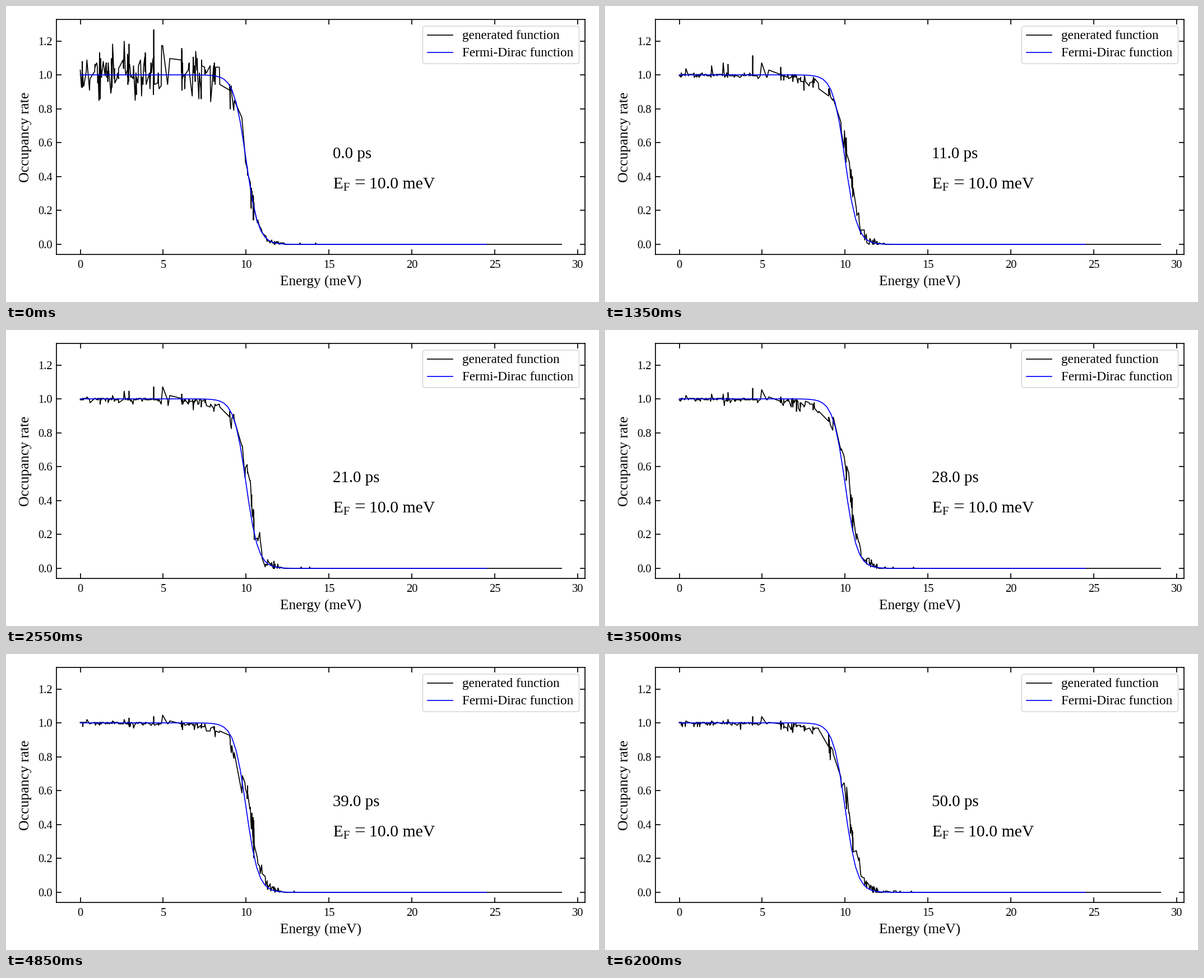
Write a matplotlib script that moves like this. It is 1058 px wide and 529 px high and loops after 6250 ms.

```python
import math

import numpy as np
import matplotlib.pyplot as plt
from matplotlib.animation import FuncAnimation
from matplotlib.patches import FancyBboxPatch

W, H, DPI = 1058, 529, 64
FRAMES, STEP = 125, 0.4          # frame count, ps per frame
E_F, KT = 10.0, 0.366            # meV
QUANTUM = 0.0085                 # smallest change in occupancy

# Overfull levels that relax slowly: energy -> (excess, time constant in ps)
SLOW = {0.4: (0.09, 15), 1.95: (0.185, 7), 2.65: (0.195, 10),
        2.94: (0.18, 12), 4.43: (0.265, 14), 4.97: (0.17, 25),
        5.4: (0.1, 10), 6.12: (0.16, 8)}

rng = np.random.default_rng(12)


def pt(px):
    return px * 72 / DPI


def fermi(e, mu=E_F, kt=KT):
    return 1 / (1 + np.exp((e - mu) / kt))


def build_levels(pairs=155):
    """Energies in close pairs, with noisy starting values and decay times."""
    base = rng.uniform(0.03, 15, pairs)
    e = np.sort(np.concatenate([[0, 29.03], base, base + 0.03, list(SLOW)]))
    f = fermi(e)
    value = f + 0.064 * np.sqrt(f) * rng.standard_normal(e.size)
    tau = rng.uniform(0.7, 2.5, e.size)
    for level, (excess, slow_tau) in SLOW.items():
        i = np.searchsorted(e, level)
        value[i], tau[i] = 1 + excess, slow_tau
    return e, value, tau


def correlated_noise(keep=0.6):
    rows = rng.standard_normal((FRAMES, energy.size))
    for k in range(1, FRAMES):
        rows[k] = keep * rows[k - 1] + math.sqrt(1 - keep ** 2) * rows[k]
    return rows


energy, start, tau = build_levels()
# Relaxed state: a shifted step whose lower side is softer
goal = fermi(energy, 10.2, np.where(
    energy > 10.2, 0.35, 0.5 + 0.09 * (10.2 - energy)))
spread = 0.1 * np.sqrt(goal * (1 - goal)) * (energy > 6)
noise = correlated_noise()
blips = (rng.random(noise.shape) < 0.3 * np.exp(1.5 * (12 - energy))) \
    & (energy > 12)


def occupancy(k):
    value = goal + (start - goal) * np.exp(-np.sqrt(k * STEP / tau))
    if k:
        value += 0.002 + spread * noise[k] - 0.004 * goal * noise[k] ** 2
    value = np.where(energy > 12, blips[k] * QUANTUM, value)
    return np.round(np.clip(value, 0, None) / QUANTUM) * QUANTUM


plt.rcParams["font.family"] = "Liberation Serif"
fig = plt.figure(figsize=(W / DPI, H / DPI), dpi=DPI, facecolor="white")

# Plot frame in pixels, with limits from the pixel scale
LEFT, RIGHT, TOP, BOTTOM = 90, 1033, 24, 444
X0, Y0, SX, SY = 132.5, 426, 29.58, 302.9
ax = fig.add_axes([LEFT / W, 1 - BOTTOM / H,
                   (RIGHT - LEFT) / W, (BOTTOM - TOP) / H])
ax.set_xlim((LEFT - X0) / SX, (RIGHT - X0) / SX)
ax.set_ylim((Y0 - BOTTOM) / SY, (Y0 - TOP) / SY)
ax.set_xticks(range(0, 31, 5))
ax.set_yticks(np.arange(7) * 0.2)
ax.tick_params(direction="in", length=pt(9), width=pt(1.7), top=True,
               right=True, labelbottom=False, labelleft=False)
for spine in ax.spines.values():
    spine.set_linewidth(pt(1.7))

# Overlay measured in pixels from the top left corner
page = fig.add_axes([0, 0, 1, 1])
page.set_xlim(0, W)
page.set_ylim(H, 0)
page.axis("off")


def label(x, y, text, size, ha="left", **kw):
    return page.text(x, y, text, fontsize=pt(size), ha=ha, va="baseline", **kw)


for n in range(0, 31, 5):
    label(X0 + n * SX, 468, str(n), 20.5, "center")
for n in range(7):
    label(82.5, Y0 - n * 0.2 * SY + 7, f"{n * 0.2:.1f}", 20.5, "right")
label(561.5, 500, "Energy (meV)", 25.2, "center")
label(41, 234.5, "Occupancy rate", 25.7, "center",
      rotation=90, rotation_mode="anchor")

clock = label(583, 272, "0.0 ps", 29)
label(583, 326, "E", 29)
label(601, 330, "F", 20.5)
label(621, 327, "=", 35)
label(648, 326, "10.0 meV", 29.8)

page.add_patch(FancyBboxPatch(
    (743.5, 36), 279, 67, boxstyle="round,pad=0,rounding_size=4",
    facecolor="white", edgecolor="0.8", linewidth=pt(1.2)))
for y, color, name in [(52, "black", "generated function"),
                       (83, "blue", "Fermi-Dirac function")]:
    page.plot([751.5, 797], [y, y], color=color, lw=pt(1.7))
    label(814, y + 7, name, 23.3)

curve, = ax.plot(energy, occupancy(0), color="black", lw=pt(1.7))
grid = np.linspace(0, 24.5, 100)
ax.plot(grid, fermi(grid), color="blue", lw=pt(1.7))


def update(k):
    curve.set_ydata(occupancy(k))
    clock.set_text(f"{math.ceil(round(k * STEP, 6)):.1f} ps")
    return curve, clock


anim = FuncAnimation(fig, update, frames=FRAMES, interval=50,
                     repeat=True, repeat_delay=0, blit=False)
plt.show()
```
